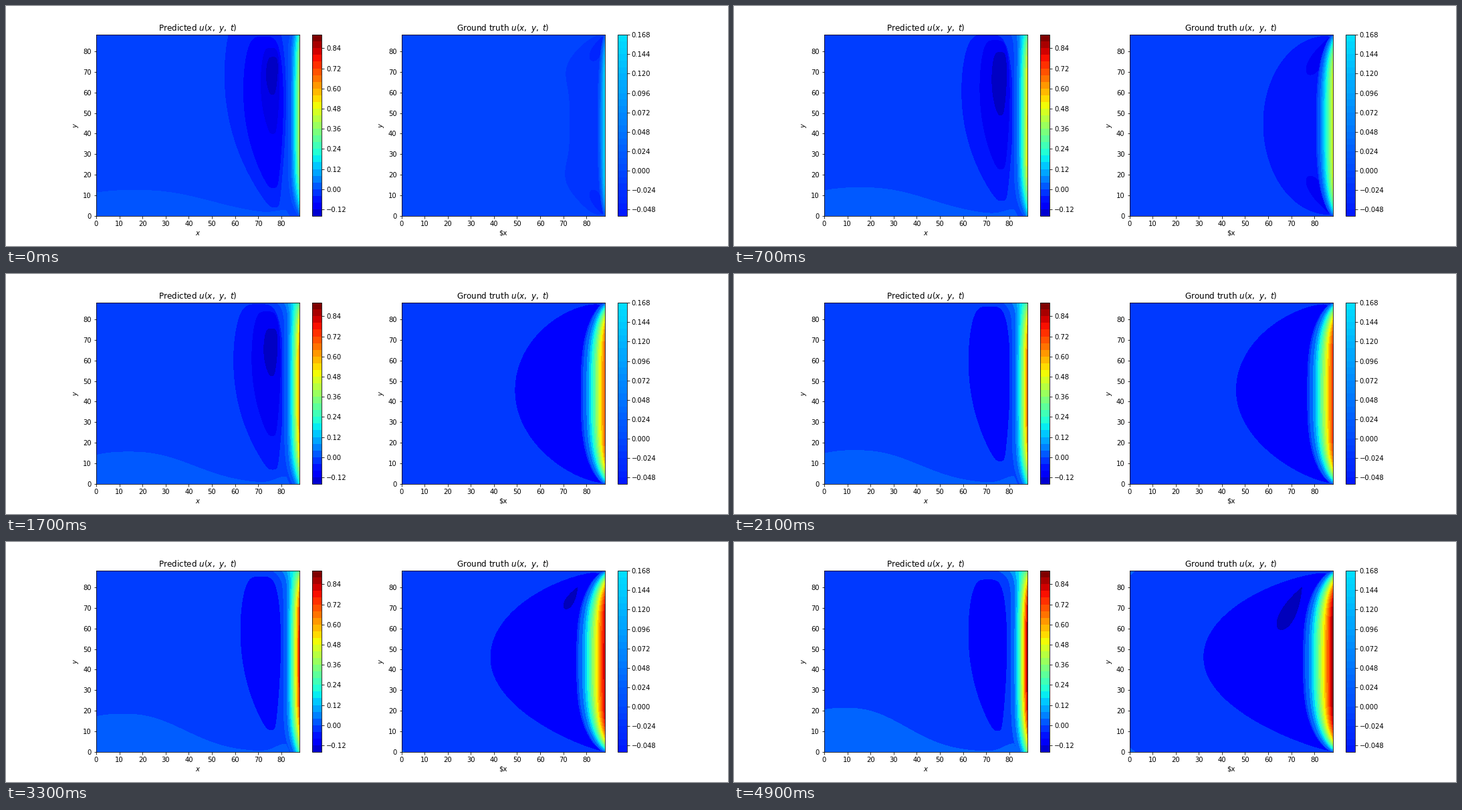
Recreate the animation shown at these times as a matplotlib script. Size 1080 by 360 pixels, loop 5000 ms.

```python
import numpy as np
import matplotlib.pyplot as plt
from matplotlib.animation import FuncAnimation
from matplotlib.cm import ScalarMappable
from matplotlib.colors import Normalize

plt.rcParams.update({"font.family": "DejaVu Sans", "font.size": 10,
                     "figure.subplot.bottom": 0.125})
FRAMES, SIZE = 50, 88
JET = plt.get_cmap("jet")
NORM = Normalize(-0.22, 0.9)
NICE_STEPS = np.array([0.01, 0.015, 0.02, 0.025, 0.03, 0.04, 0.05, 0.06])
X, Y = np.meshgrid(np.linspace(68, SIZE, 161), np.linspace(0, SIZE, 177))
Q = Y / 44 - 1
LOW, HIGH = np.clip(-Q, 0, 1), np.clip(Q, 0, 1)
TURN = np.linspace(0, 2 * np.pi, 121)

fig, (left, right) = plt.subplots(1, 2, figsize=(15, 5), dpi=72, facecolor="white")
shown = []


def setup(ax, title, xlabel, step, first, last, ticks):
    ax.set(xlim=(0, SIZE), ylim=(0, SIZE), title=title, xlabel=xlabel, ylabel="$y$")
    bar = fig.colorbar(ScalarMappable(NORM, JET), ax=ax,
                       boundaries=step * np.arange(first, last + 1),
                       ticks=step * ticks, spacing="proportional")
    bar.minorticks_off()


setup(left, r"Predicted $u(x,\ y,\ t)$", "$x$", 0.04, -4, 23, np.arange(-3, 22, 3))
setup(right, r"Ground truth $u(x,\ y,\ t)$", "$x", 0.008, -7, 21, np.arange(-6, 22, 3))


def nice_step(span, parts):
    """Smallest round contour step that splits the span into few enough parts."""
    k = np.searchsorted(NICE_STEPS, span / parts)
    return NICE_STEPS[min(k, len(NICE_STEPS) - 1)]


def shade(step, depth):
    """Colour of the background (depth 0) and of the wells below it."""
    return JET(NORM(-(0.25 + 1.2 * depth) * step))


def light(step):
    return JET(NORM(0.5 * step))


def mix(a, b, k):
    return np.asarray(a) * (1 - k) + np.asarray(b) * k


def fill(ax, points, color):
    shown.extend(ax.fill(*np.transpose(points), color=color,
                         lw=0, antialiased=False, zorder=1))


def layer(width, edge, fall, power):
    """Boundary layer: high on the right edge, slightly negative further in."""
    r = (SIZE - X) / np.maximum(width, 0.05)
    return np.where(r < 1, edge * np.clip(1 - r, 0, 1) ** power, fall * (1 - r))


def rim(ax, u, step):
    """Band just below zero, in the background colour."""
    shown.append(ax.contourf(X, Y, u, levels=[-step, 0], colors=[shade(step, 0)]))


def stripes(ax, u, step):
    levels = step * np.arange(int(np.ceil(u.max() / step)) + 1)
    shown.append(ax.contourf(X, Y, u, levels=levels, cmap=JET, norm=NORM))


def well(d, drift):
    """Egg-shaped contour; greater depth d gives a smaller, higher egg."""
    x0 = 59 + 9.7 * d - 1.4 * d**2
    x1 = 82 - 1.35 * d - 0.5 * drift
    y0 = 7.5 + 10 * d + 5.4 * d**2 + drift * (d**2 - 0.4)
    y1 = 88 - 1.3 * d - 1.5 * d**2 - 0.8 * drift * (1 + d**2) + 30 * max(-d, 0)
    s, c = np.sin(TURN), np.cos(TURN)
    down = (1 - s) / 2
    half = (x1 - x0) / 2 * (1 - (0.65 - 0.1 * d) * down**3)
    x = x1 - 1.2 * down - half + half * np.sign(c) * np.abs(c) ** 0.5
    return np.column_stack([x, y1 - (y1 - y0) * down])


def petal(tip, end, width):
    """Drop pointed at the tip and round at the end."""
    tip, end = np.asarray(tip), np.asarray(end)
    axis = end - tip
    side = np.array([-axis[1], axis[0]]) / np.hypot(*axis)
    t = (1 - np.cos(TURN)) / 2
    return tip + np.outer(t, axis) + np.outer(width * np.sin(TURN) * np.sqrt(t), side)


def draw_prediction(i, age):
    amp = 0.42 + 0.2 * age + 0.0055 * i
    step = nice_step(amp + 0.13, 20)
    left.set_facecolor(shade(step, 0))

    # Coarser contour steps show fewer of the wells
    depths = (-0.4, 0.5, 1.7, 2.3) if step < 0.04 else (0, 1, 2) if step < 0.05 else (0.35,)
    for k, d in enumerate(depths, 1):
        fill(left, well(d, max(0, (i - 7) / 10)), shade(step, k))

    width = (5 + 2.3 * age) * (1 - (0.9 - 0.5 * age) * LOW**6 + (age - 0.2) * HIGH**14)
    edge = amp * (1 - (0.95 - 0.35 * age) * LOW**3 - (0.35 + 0.3 * age) * HIGH**4)
    u = layer(width, edge, 0.55 * amp, 1.8)
    rim(left, u, step)

    # Light hump along the bottom, rising again where it meets the layer
    x = np.linspace(0, 82, 83)
    hump = np.abs(x - 16.5 + 0.155 * i) / (42 - 9 * age)
    y = (12.5 + 0.18 * i) * np.exp(-hump**2.4)
    y += (2 + 2 * age) * np.exp(-((x - 82) / 6) ** 2)
    fill(left, np.vstack([np.column_stack([x, y]), [(83.5, 0), (0, 0)]]), light(step))
    stripes(left, u, step)


def dome(i, age):
    """Large region left of the layer, from an ellipse towards a parabola."""
    tip = 31.3 + 26.4 * ((55 - i) / 48) ** 1.65 + 8.5 * np.exp(-i / 2)
    k = np.clip((i - 7) / 20, 0, 1)
    mid = 45 + k
    s = np.sin(np.linspace(np.pi / 2, -np.pi / 2, 121))
    up = s > 0
    dy = s * np.where(up, 87.4 - 0.014 * i - mid, mid - 0.8)
    end = np.where(up, 87 - 4 * age, 86.3)
    bulge = 1 - (1 - s**2) ** (0.5 + k * np.where(up, 0.2, 0.35))
    lobes = 4.6 * np.exp(-i - ((np.abs(dy) - 28) / 12) ** 2)
    x = tip + (end - tip) * bulge - lobes
    return np.vstack([np.column_stack([x, mid + dy]), [(87.5, 2), (87.5, 86)]])


def draw_truth(i, age):
    amp = 0.165 + 0.74 * age
    step = nice_step(amp + 0.05 + 0.12 * age, 15)
    right.set_facecolor(shade(step, 0))

    fill(right, dome(i, age), shade(step, 1))
    if step < 0.05:
        k = i / 7
        spot = petal((87, 87), mix((82.5, 75.5), (77.5, 68.8), k), 2.8 + k)
        fill(right, spot, shade(step, 2))
        fill(right, np.abs(spot - (0, SIZE)), shade(step, 2))
    if i >= 25:
        k = (i - 26) / 23
        drop = petal(mix((76.8, 79.8), (74.5, 79.8), k),
                     mix((73.3, 74), (65, 59.6), k), 1.5 + 2.7 * k)
        fill(right, drop, shade(step, 2))

    c = max(0, (i - 15) / 15)
    for y, dy in ((0, c), (SIZE, -c)):
        fill(right, [(0, y), (c, y), (0, y + dy)], light(step))

    width = (2.8 + 9.4 * age) * (1 - np.abs(Q) ** 3) ** 0.7
    u = layer(width, amp * (1 - Q**6), 0.9 * amp, 1.35)
    rim(right, u, step)
    stripes(right, u, step)


def draw(i):
    for artist in shown:
        artist.remove()
    shown.clear()
    age = 1 - np.exp(-i / 14)
    draw_prediction(i, age)
    draw_truth(i, age)


anim = FuncAnimation(fig, draw, frames=FRAMES, interval=100, repeat=True)
plt.show()
```
